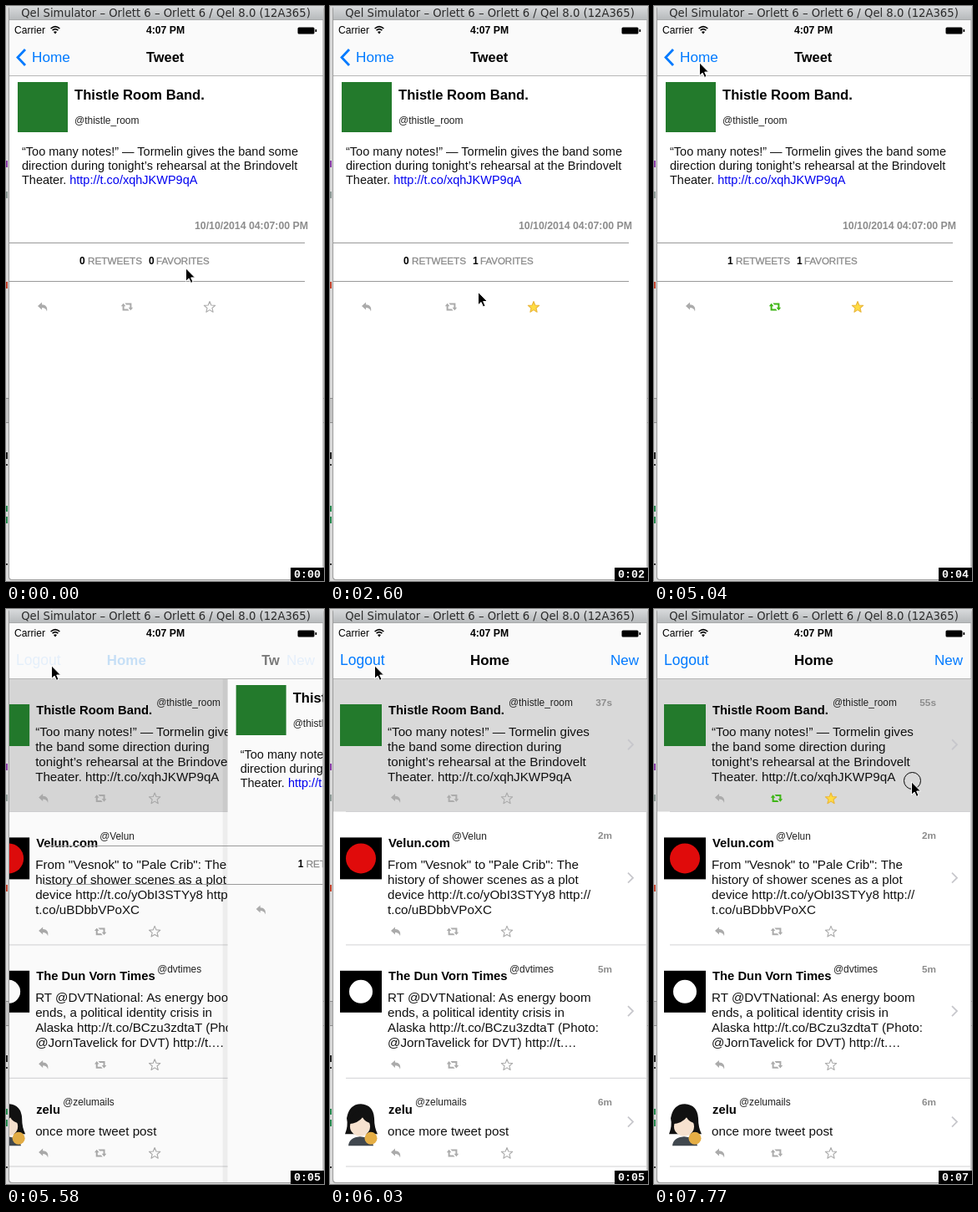
Write an HTML page that moves like this. It is 381x688 px and loops after 8000 ms.

```html
<!DOCTYPE html>
<html lang="en">
<head>
<meta charset="utf-8">
<title>Tweet detail</title>
<style>
html, body { margin: 0; width: 100%; height: 100%; overflow: hidden; background: #fff; }
svg { display: block; width: 100vw; height: 100vh; }
text { font-family: "Liberation Sans", Arial, sans-serif; white-space: pre; }
.b { font-weight: bold; }
.mid { text-anchor: middle; }
.end { text-anchor: end; }
.medium { stroke: #8c8c8c; stroke-width: .35; }
</style>
</head>
<body>
<svg id="stage" viewBox="0 0 381 688" preserveAspectRatio="none"></svg>
<script>
const BLUE = '#007aff', GREY = '#8c8c8c', GREEN = '#3fb516', PALE = '#ababab', NAV = '#fafafa';
const LOOP = 8000, WIDTH = 375;

const text = (x, y, size, s, fill = '#000', cls = '', id = '') =>
  `<text x="${x}" y="${y}" font-size="${size}" fill="${fill}" class="${cls}" id="${id}">${s}</text>`;
const rect = (x, y, w, h, fill, extra = '') =>
  `<rect x="${x}" y="${y}" width="${w}" height="${h}" fill="${fill}" ${extra}/>`;
const circle = (x, y, r, fill) => `<circle cx="${x}" cy="${y}" r="${r}" fill="${fill}"/>`;
const path = (d, extra) => `<path d="${d}" ${extra}/>`;

const starPoints = Array.from({ length: 10 }, (_, i) => {
  const r = i % 2 ? 3.1 : 7, a = i * Math.PI / 5 - Math.PI / 2;
  return (r * Math.cos(a)).toFixed(2) + ',' + (r * Math.sin(a) + .5).toFixed(2);
}).join(' ');

function icons(xs, y, id) {
  const at = (i, s, name) => `<g transform="translate(${xs[i]} ${y})" id="${id + name}">${s}</g>`;
  const half = 'M-7.2-.8L-4.4-4.2L-1.6-.8H-3.4V2.4H.8L2.6 4.4H-5.4V-.8Z';
  return at(0, path('M-6-1L-1-5.4V-2.8C3.4-2.6 6.2 0 5 5.4C4 2.2 2 1 -1 1V3.6Z', `fill="${PALE}"`), 'Reply') +
    at(1, path(half, '') + path(half, 'transform="rotate(180)"'), 'Rt') +
    at(2, `<polygon points="${starPoints}" stroke-width="1.1" stroke-linejoin="round"/>`, 'Star');
}

const chevron = y => path(`M357 ${y - 6}l6 6l-6 6`, 'fill="none" stroke="#c7c7cc" stroke-width="1.8"');

const post = 'Tormelin gives', link = 'http://t.co/xqhJKWP9qA';
const rows = [
  { name: 'Thistle Room Band.', handle: '@thistle_room', hx: 214, age: '37s', y: 84, h: 158.5,
    lines: [`“Too many notes!” — ${post}`, 'the band some direction during', 'tonight’s rehearsal at the Brindovelt', `Theater. ${link}`],
    art: rect(12, 30, 50, 50, '#237a2c') },
  { name: 'Velun.com', handle: '@Velun', hx: 146, age: '2m', y: 243.4, h: 158.5,
    lines: ['From "Vesnok" to "Pale Crib": The', 'history of shower scenes as a plot', 'device http://t.co/yObI3STYy8 http://', 't.co/uBDbbVPoXC'],
    art: rect(12, 30, 50, 50, '#000') + circle(37, 55, 18, '#e00b0b') },
  { name: 'The Dun Vorn Times', handle: '@dvtimes', hx: 215, age: '5m', y: 402.8, h: 158.5,
    lines: ['RT @DVTNational: As energy boom', 'ends, a political identity crisis in', 'Alaska http://t.co/BCzu3zdtaT (Photo:', '@JornTavelick for DVT) http://t.…'],
    art: rect(12, 30, 50, 50, '#000') + circle(37, 55, 14, '#fff') },
  { name: 'zelu', handle: '@zelumails', hx: 102, age: '6m', y: 562.2, h: 104.8,
    lines: ['once more tweet post'],
    art: path('M22 80Q23 70 36 69Q50 70 52 80Z', 'fill="#41484f"') +
      path('M18 66Q22 56 20 47Q23 30 37 30Q52 31 53 47Q53 58 57 66Z', 'fill="#111"') +
      '<ellipse cx="36" cy="57" rx="12" ry="11.5" fill="#f7e2cf"/>' +
      path('M22 54Q25 39 38 39Q49 40 50 53Q42 52 39 46Q34 53 22 54Z', 'fill="#111"') + circle(49, 71, 7.5, '#e5ae45') }
];

function row(r, i) {
  const first = i === 0;
  return `<g transform="translate(0 ${r.y})">` +
    (first ? rect(4, 0, 376, 158.5, '#d9d9d9', 'id="lit"') : '') + r.art +
    text(70, 41.5, 14.8, r.name, '#000', 'b') +
    text(r.hx, 32.3, 11.9, r.handle, '#222') +
    text(338, 32, 11.8, r.age, GREY, 'b end', 'age' + i) +
    r.lines.map((s, n) => text(69, 67.5 + n * 18, 15.2, s, '#111')).join('') +
    icons([79, 147, 212], r.h - 16, 'row' + i) + chevron(r.h / 2 - 1) +
    rect(19, r.h - .5, 361, 1, '#d2d2d4') + '</g>';
}

const home = rect(4, 84, 376, 602, '#fff') + rows.map(row).join('');

const detail = rect(-2, 84, 6, 602, '#000', 'opacity=".05"') + rect(4, 84, 376, 602, '#fff', 'id="paper"') +
  rect(14, 91, 60, 60, '#237a2c') +
  text(82, 112, 16.6, rows[0].name, '#000', 'b') +
  text(82, 141, 12, rows[0].handle, '#222') +
  text(19, 179, 14.5, `“Too many notes!” — ${post} the band some`, '#111') +
  text(19, 196, 14.5, 'direction during tonight’s rehearsal at the Brindovelt', '#111') +
  text(19, 212.5, 14.5, `Theater. <tspan fill="#0000f0">${link}</tspan>`, '#111') +
  text(362, 267, 12.3, '10/10/2014 04:07:00 PM', GREY, 'b end') +
  rect(-216, 283, 574, 1, '#999', 'class="rule"') + rect(-216, 329, 574, 1, '#999', 'class="rule"') +
  text(88, 309, 12, '0', '#000', 'b', 'rtCount') + text(98, 309, 11.7, 'RETWEETS', GREY, 'medium') +
  text(171, 309, 12, '0', '#000', 'b', 'favCount') + text(180, 309, 11.5, 'FAVORITES', GREY, 'medium') +
  icons([44, 145, 244], 360, 'tweet');

const nav = rect(4, 17, 376, 66, NAV) + rect(4, 83, 376, 1, '#b6b6b6') +
  text(10, 33, 12.1, 'Carrier') +
  path('M53.6 27Q59 22.3 64.4 27M55.6 29.2Q59 26.2 62.4 29.2', 'fill="none" stroke="#000" stroke-width="1.6"') +
  path('M57 31Q59 29.4 61 31L59 33.4Z', '') +
  text(191, 33.3, 12.2, '4:07 PM', '#000', 'b mid') +
  rect(349.5, 25.5, 20, 8, '#000', 'rx="1.5"') + rect(370.5, 28, 1.7, 3, '#000') +
  '<g id="back">' + path('M23 52l-9 9.5l9 9.5', `fill="none" stroke="${BLUE}" stroke-width="2.8"`) +
  text(31, 67, 17.2, 'Home', BLUE, '', 'backText') + '</g>' +
  text(168, 67, 16.4, 'Tweet', '#000', 'b', 'tweetTitle') +
  rect(328, 45, 50, 36, NAV, 'id="mask"') +
  text(168, 67, 16.9, 'Home', '#000', 'b', 'homeTitle') +
  '<g id="buttons">' + text(12, 67, 17.5, 'Logout', BLUE) + text(336, 67, 17, 'New', BLUE) + '</g>';

// Slivers of the desktop that show beside the window
const desktop = rect(0, 0, 381, 688, '#d9d9d9') + rect(0, 470, 4, 29, '#c3c3c3') +
  rect(0, 469, 381, 1, '#8c8c8c') + rect(0, 498, 381, 1, '#8c8c8c') +
  [[185, 8, '#8b3fa8'], [222, 8, '#8d9a96'], [330, 8, '#c4452f'], [534, 8, '#222'], [548, 2, '#333'], [598, 7, '#278a50'], [611, 8, '#278a50'], [667, 2, '#333']]
    .map(([y, h, c]) => rect(0, y, 2, h, c)).join('');

const svg = document.getElementById('stage');
svg.innerHTML = `<defs>
  <linearGradient id="bar" x2="0" y2="1"><stop stop-color="#d9dbdd"/><stop offset="1" stop-color="#b6b9bb"/></linearGradient>
  <clipPath id="win"><path d="M4 16H379.5V682Q379.5 686 376 686H8Q4 686 4 682Z"/></clipPath></defs>` +
  desktop + rect(3, 0, 377.5, 687, '#9c9c9c', 'rx="4"') + rect(4, 0, 376, 16.5, 'url(#bar)') +
  `<text x="191.5" y="12.5" font-size="13.2" fill="#2a2a2a" class="mid" style="font-family:'DejaVu Sans',sans-serif">Qel Simulator – Orlett 6 – Orlett 6 / Qel 8.0 (12A365)</text>` +
  `<g clip-path="url(#win)"><g id="home">${home}</g>` + rect(4, 84, 376, 602, '#000', 'id="dim"') +
  `<g id="detail">${detail}</g>${nav}</g>` +
  '<circle id="press" r="10" fill="none" stroke="#000"/>' +
  path('M0 0V15.5L3.6 12.2L6 17.6L8.6 16.5L6.2 11.2H11Z', 'id="cursor" stroke="#fff" stroke-width="1"') +
  rect(341, 672, 40, 16, '#000') +
  `<text id="clock" x="345" y="684" font-size="13.3" fill="#fff" class="b" style="font-family:'Liberation Mono',monospace"></text>`;

const el = {};
svg.querySelectorAll('[id]').forEach(e => { if (e.id) el[e.id] = e; });
const rules = svg.querySelectorAll('.rule');
const set = (id, name, v) => el[id].setAttribute(name, v);
const show = (id, on) => set(id, 'visibility', on ? 'visible' : 'hidden');
const clamp = v => Math.max(0, Math.min(1, v));

function paintIcons(id, rt, fav) {
  set(id + 'Rt', 'fill', rt ? GREEN : PALE);
  set(id + 'Star', 'fill', fav ? '#ffdc42' : 'none');
  set(id + 'Star', 'stroke', fav ? '#eab73c' : PALE);
}
rows.forEach((r, i) => paintIcons('row' + i, false, false));

const track = [
  [0, 215, 313], [600, 244, 359], [900, 244, 359], [1600, 285, 306], [1900, 288, 303],
  [2300, 211, 326], [2900, 143, 357], [3150, 143, 357], [3300, 142, 358], [3750, 143, 358],
  [4050, 143, 358], [4740, 90, 92], [5040, 54, 67], [5880, 54, 67], [6030, 53, 67],
  [6330, 53, 67], [7030, 304, 262], [7480, 308, 206], [LOOP, 308, 206]
];
function cursorAt(t) {
  const i = track.findIndex(k => k[0] > t);
  const [t0, x0, y0] = track[i - 1], [t1, x1, y1] = track[i];
  const k = (t - t0) / (t1 - t0);
  return [x0 + (x1 - x0) * k, y0 + (y1 - y0) * k];
}

const syncs = [0, 1150, 2300, 3300, 4290, 5280, 7030, 7620, 7770];
const ticks = [1150, 2300, 3300, 4290, 5280, 6480, 7480];
const presses = [[600, 900], [3750, 3900], [5280, 5430], [7620, LOOP]];
const hold = t => {
  const base = syncs.filter(s => s <= t).pop();
  return base + Math.floor((t - base) / 150) * 150;
};

// Critically damped spring of the pop transition
function popAt(t) {
  if (t >= 6030) return 1;
  const w = Math.max(0, t - 5447) * .01826;
  return 1 - (1 + w) * Math.exp(-w);
}

function draw(time) {
  const t = hold(time), p = popAt(t), moving = p > 0 && p < 1;
  const fav = t >= 900, rt = t >= 3900, fresh = t >= 6180;

  set('home', 'transform', `translate(${-112 * (1 - p)} 0)`);
  set('detail', 'transform', `translate(${WIDTH * p} 0)`);
  show('detail', p < 1);
  set('paper', 'fill', moving ? NAV : '#fff');
  set('dim', 'opacity', .065 * (1 - p));
  rules.forEach(r => r.setAttribute('opacity', p < .9 ? 1 : 0));

  set('back', 'opacity', clamp(1 - p * 2));
  set('backText', 'x', 31 + 137 * p);
  set('tweetTitle', 'x', 168 + 198 * p);
  set('tweetTitle', 'opacity', 1 - p * p);
  show('mask', moving);
  const ink = clamp((p - .7) / .3);
  set('homeTitle', 'x', 168 - 156 * (1 - p));
  set('homeTitle', 'fill', `rgb(0,${Math.round(122 * (1 - ink))},${Math.round(235 * (1 - ink))})`);
  set('homeTitle', 'opacity', clamp((p - .62) / .38));
  set('buttons', 'opacity', clamp((p - .67) / .33));

  el.favCount.textContent = fav ? 1 : 0;
  el.rtCount.textContent = rt ? 1 : 0;
  paintIcons('tweet', rt, fav);
  paintIcons('row0', fresh, fresh);
  el.age0.textContent = fresh ? '55s' : '37s';
  show('lit', !fresh || t >= 7620);

  const [x, y] = cursorAt(t);
  set('cursor', 'transform', `translate(${x + .5} ${y + .8})`);
  set('press', 'cx', x + 1.5);
  set('press', 'cy', y - .5);
  show('press', presses.some(([a, b]) => t >= a && t < b));
  el.clock.textContent = '0:0' + ticks.filter(s => s <= t).length;
}

const start = performance.now();
function loop() {
  draw((performance.now() - start) % LOOP);
  requestAnimationFrame(loop);
}
loop();
</script>
</body>
</html>
```
